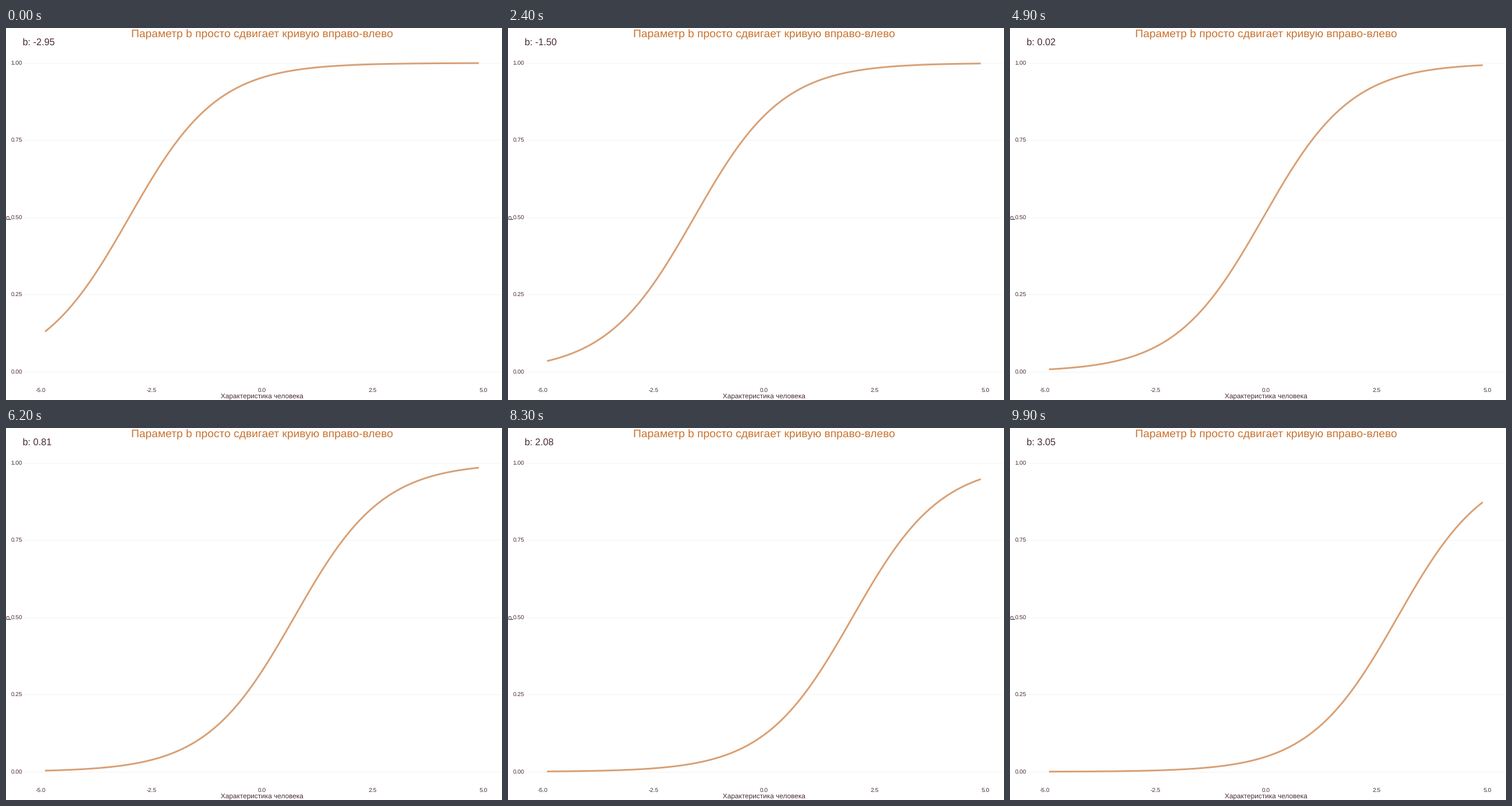
Recreate the animation shown at these times as a matplotlib script. Size 864x648 px, loop 10 s.

```python
import numpy as np
import matplotlib.pyplot as plt
from matplotlib.animation import FuncAnimation

W, H = 864, 648
FRAMES, INTERVAL = 100, 100
INK, ORANGE, CURVE, GRID = "#4a2a3a", "#c87431", "#d9a074", "#f3f3f3"

plt.rcParams["font.family"] = "Liberation Sans"
plt.rcParams["text.hinting"] = "none"

# At 72 dpi one point equals one pixel
fig = plt.figure(figsize=(W / 72, H / 72), dpi=72, facecolor="white")
ax = fig.add_axes([0, 0, 1, 1])
ax.set_xlim(0, W)
ax.set_ylim(H, 0)
ax.axis("off")


def to_x(v):
    return 445.8 + 77.1 * v


def to_y(p):
    return 598.8 - 537.8 * p


def label(x, y, text, size, color=INK, ha="center", **kw):
    return ax.text(x, y, text, fontsize=size, color=color, ha=ha,
                   va="baseline", **kw)


for p in np.linspace(0, 1, 5):
    ax.plot([32, 861], [to_y(p)] * 2, color=GRID, lw=1)
    label(28.2, to_y(p) + 3.7, f"{p:.2f}", 10.2, ha="right")

for v in np.linspace(-5, 5, 5):
    label(to_x(v), 635.2, f"{v:.1f}", 10.2)

label(446, 15.6, "Параметр b просто сдвигает кривую вправо-влево", 19.45, ORANGE)
label(446, 644.6, "Характеристика человека", 12)
ax.text(5.7, 329.8, "P", fontsize=12, color=INK, rotation=90,
        ha="center", va="center")

counter = label(29, 30, "", 16.5, ha="left")
theta = np.linspace(-4.9, 4.9, 197)
curve, = ax.plot([], [], color=CURVE, lw=3, solid_capstyle="butt",
                 solid_joinstyle="round")


def update(i):
    b = -2.95 + 6 * i / (FRAMES - 1)
    counter.set_text(f"b: {b:.2f}")
    # The curve trails the counter slightly and starts at -3
    shift = max(-3, b - 0.08)
    curve.set_data(to_x(theta), to_y(1 / (1 + np.exp(shift - theta))))
    return curve, counter


anim = FuncAnimation(fig, update, frames=FRAMES, interval=INTERVAL,
                     repeat=True, repeat_delay=0)
plt.show()
```
